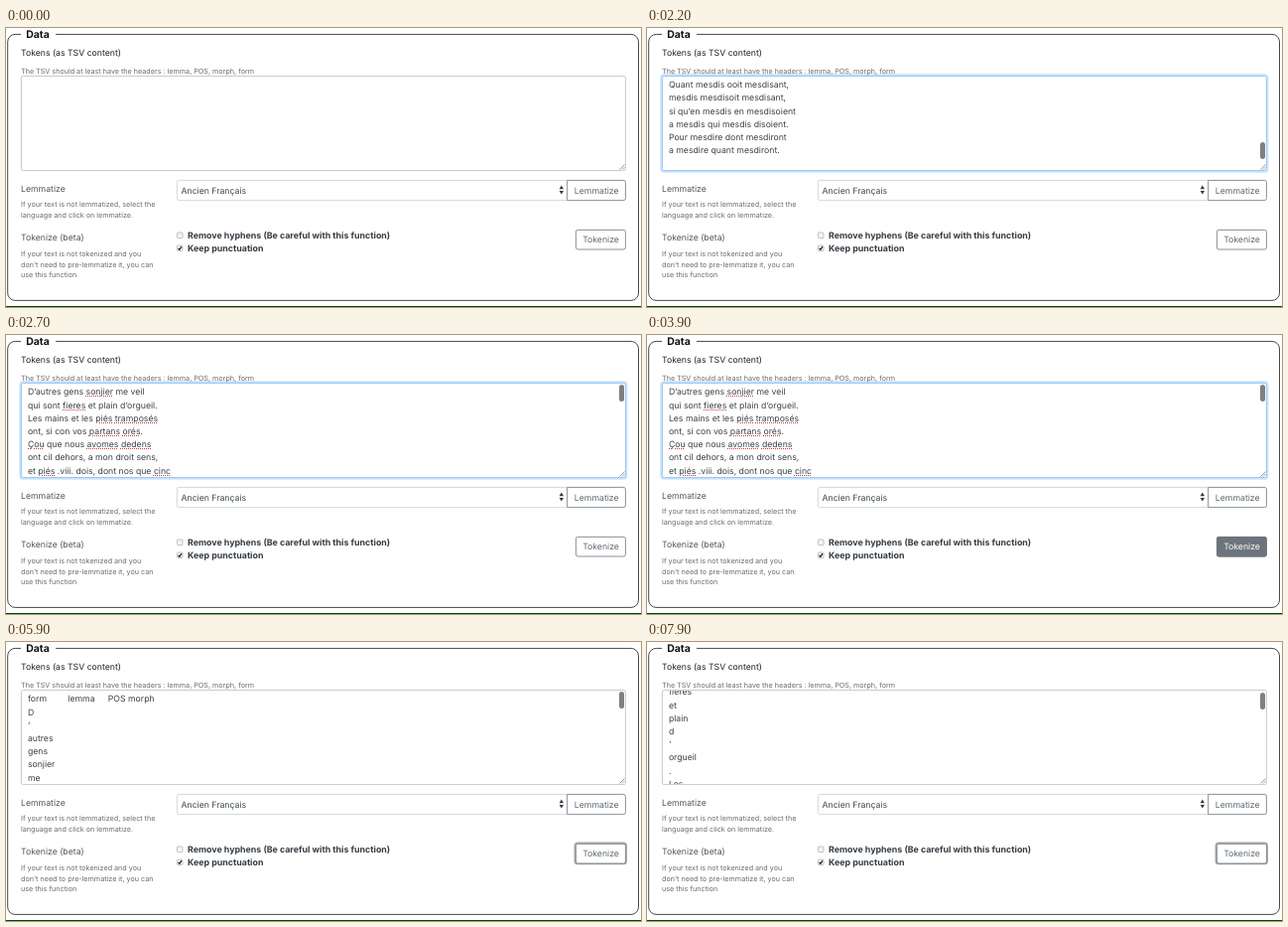
An HTML page that plays this animation: 640x281 px, repeating every 8 s.

```html
<!DOCTYPE html>
<html lang="en">
<head>
<meta charset="utf-8">
<style>
  html, body { margin: 0; width: 100%; height: 100%; overflow: hidden; background: #fff; }
  svg, #area { position: absolute; left: 0; top: 0; }
  svg { width: 640px; height: 281px; }
  svg, #text { font: 8.7px Inter, "Open Sans", sans-serif; text-rendering: geometricPrecision; }
  text { fill: #555; }
  .small { font-size: 7.2px; fill: #6a6a6a; }
  .bold { font-size: 8.85px; font-weight: 700; fill: #343b42; }
  .btn { fill: #5f676e; text-anchor: middle; }
  .box { fill: #fff; stroke: #6c757d; stroke-width: .8; }
  #area { left: 16px; top: 49px; width: 608px; height: 94px; overflow: hidden; }
  #text { position: absolute; left: 5.9px; top: 3.4px; line-height: 13.2px; white-space: pre;
    tab-size: 20.2px; color: #3c4248; }
  #text.checked u { text-decoration: underline dotted #c9353a 1px; text-underline-offset: 1px; }
  u { text-decoration: none; }
  #caret { position: absolute; left: 6.3px; width: 1px; height: 11px; background: #555; }
  #thumb { position: absolute; left: 602.3px; width: 5px; height: 17px; border-radius: 3px; background: #808080; }
</style>
</head>
<body>
<svg viewBox="0 0 640 281">
  <rect x="1.7" y="6.4" width="635.8" height="268" rx="7.5" fill="none" stroke="#333" stroke-width=".9"/>
  <path d="M15 6.5H50" stroke="#fff" stroke-width="3"/>
  <text x="20.2" y="10.3" style="font-size:10.5px;font-weight:700;fill:#111">Data</text>
  <rect y="280" width="640" height="1" fill="#064a06"/>

  <text x="15" y="28" style="fill:#222">Tokens (as TSV content)</text>
  <text class="small" x="15" y="45.7">The TSV should at least have the headers : lemma, POS, morph, form</text>
  <rect id="glow" x="14.2" y="47.2" width="611.3" height="97.6" rx="3" fill="none" stroke="#007bff" stroke-opacity=".2" stroke-width="2"/>
  <rect id="edge" x="15.4" y="48.4" width="609" height="95.2" rx="2" fill="#fff" stroke-width=".9"/>

  <text x="15" y="165">Lemmatize</text>
  <text class="small" x="15" y="180.2">If your text is not lemmatized, select the</text>
  <text class="small" x="15" y="191">language and click on lemmatize.</text>
  <path d="M565.5 153.4H174.4q-2 0-2 2v16.2q0 2 2 2H565.5" fill="#fff" stroke="#ced4da" stroke-width=".9"/>
  <text x="176.5" y="166.5" style="fill:#3f464c">Ancien Français</text>
  <path d="M557.6 162.2l2.2-3.6 2.2 3.6zM557.6 164l2.2 3.6 2.2-3.6z" fill="#343a40"/>
  <path class="box" d="M565.6 153.4H622.4q2 0 2 2v16.2q0 2-2 2H565.6z"/>
  <text class="btn" x="595.2" y="166.7">Lemmatize</text>

  <text x="15" y="214.3">Tokenize (beta)</text>
  <text class="small" x="15" y="230.1">If your text is not tokenized and you</text>
  <text class="small" x="15" y="240.7">don't need to pre-lemmatize it, you can</text>
  <text class="small" x="15" y="251.3">use this function</text>
  <g fill="#f4f4f4" stroke="#aaa" stroke-width=".7">
    <rect x="172.4" y="206" width="5.6" height="5.6" rx="1"/>
    <rect x="172.4" y="219" width="5.6" height="5.6" rx="1"/>
  </g>
  <path d="M173.6 221.8l1.2 1.5 2.2-3.2" fill="none" stroke="#111" stroke-width="1.1"/>
  <text class="bold" x="183" y="212.2">Remove hyphens (Be careful with this function)</text>
  <text class="bold" x="183" y="225.2">Keep punctuation</text>
  <rect id="ring" x="573.4" y="202.4" width="51.7" height="21" rx="2.6" fill="none" stroke="#6c757d" stroke-opacity=".6" stroke-width="1.8"/>
  <rect class="box" x="574.4" y="203.4" width="50" height="19.6" rx="2"/>
  <rect id="hover" x="574" y="203" width="50.8" height="20.4" rx="2.3" fill="#6c757d"/>
  <text id="token" class="btn" x="599.5" y="216.3">Tokenize</text>
</svg>
<div id="area">
  <div id="text"></div>
  <div id="caret"></div>
  <div id="thumb"></div>
  <svg style="left:602px;top:88px;width:6px;height:6px" viewBox="0 0 6 6"><path d="M.5 5.5l5-5M3 5.5L5.5 3" stroke="#777" stroke-width=".7"/></svg>
</div>
<script>
const $ = id => document.getElementById(id);
const LINE = 13.2, LOOP = 8000;

// Underscores mark words the spell checker rejects.
const opening = `D’autres gens _sonjier_ me veil
qui sont _fieres_ et plain d’orgueil.
Les mains et les _piés_ _tramposés_
ont, si con vos _partans_ _orés_.
_Çou_ que nous _avomes_ _dedens_
ont cil dehors, a mon droit sens,
et _piés_ .viii. dois, dont nos que _cinc_
`;
const middle = `avons es piés, si con je cuit.
Autre gent sont de tel maniere
qui ont la teste par deriere,
et sont plus noir que nule gent.
Li un sont lait, li autre gent,
si vont par bois et par montaigne
et n’ont talent que nus les praigne.
Cil ne manjuent char ne pain,
ains ont tous tans et soif et fain.
Or vos dirai de lor nature,
car mout sont fol et n’en ont cure.
`;
const ending = `Quant mesdis ooit mesdisant,
mesdis mesdisoit mesdisant,
si qu’en mesdis en mesdisoient
a mesdis qui mesdis disoient.
Pour mesdire dont mesdiront
a mesdire quant mesdiront.
`;
const source = opening + middle.repeat(2) + ending;
const poem = source.replace(/_(.+?)_/g, '<u>$1</u>');
const tokens = 'form\tlemma\tPOS morph\n' +
  source.replaceAll('_', '').match(/\p{L}+|\S/gu).join('\n');
const bottom = (source.split('\n').length - 7) * LINE;

// Value of the last [time, value] pair reached.
const at = (t, pairs) => pairs.reduce((v, [time, next]) => t >= time ? next : v, 0);
const mix = (a, b, k) => `color-mix(in srgb, ${a} ${k * 100}%, ${b})`;

let shown;
function setText(html) {
  if (html !== shown) $('text').innerHTML = shown = html;
}

function draw() {
  const t = performance.now() % LOOP;
  const focus = at(t, [[800, 1], [5300, .4], [5400, .1], [5500, 0]]);
  const hover = at(t, [[3800, .5], [3900, 1], [5800, .5], [5900, 0]]);
  const pasted = t >= 1700, tokenized = t >= 5500;

  $('glow').style.opacity = focus;
  $('edge').style.stroke = mix('#8abdf0', '#bfc3c7', Math.min(1, focus * 1.8));
  $('hover').style.opacity = hover;
  $('token').style.fill = mix('#fff', '#5f676e', hover);
  $('ring').style.opacity = at(t, [[5400, .6], [5500, 1]]);

  const up = at(t, [[1700, 1], [2300, .82], [2400, .52], [2500, .25], [2600, .08], [2700, 0]]);
  const step = Math.max(0, Math.floor((t - 7400) / 100)) / 5;
  const down = step ** 1.5;
  const scroll = tokenized ? down * 139.3 : up * bottom;

  setText(tokenized ? tokens : pasted ? poem : '');
  $('text').className = t >= 2700 ? 'checked' : '';
  $('text').style.transform = `translateY(${-scroll}px)`;
  $('thumb').style.display = pasted ? '' : 'none';
  $('thumb').style.top = 1.3 + (tokenized ? down * .8 : up * 64.7) + 'px';

  $('caret').style.display = at(t, [[800, 1], [1000, 0], [1500, 1], [2000, 0]]) ? '' : 'none';
  $('caret').style.top = (pasted ? 83.5 : 5) + 'px';
  requestAnimationFrame(draw);
}
draw();
</script>
</body>
</html>
```
